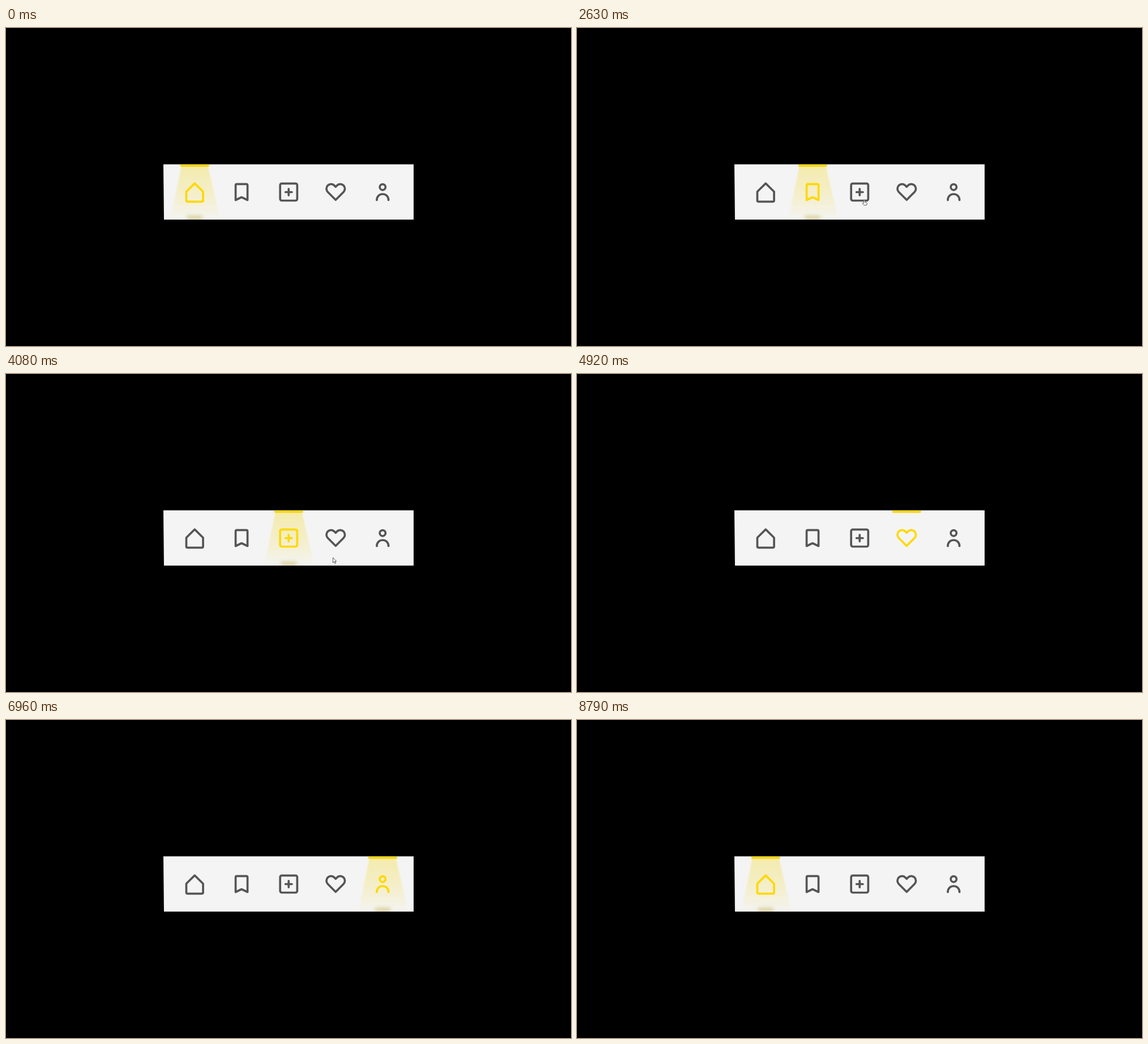
These frames come from a looping animation (998 by 561 pixels, 8.96 s). An HTML page:

```html
<!DOCTYPE html>
<html lang="en">
<head>
<meta charset="utf-8">
<title>Spotlight navigation</title>
<style>
  html, body { margin: 0; width: 100%; height: 100%; overflow: hidden; background: #000; }
  svg { display: block; width: 100%; height: 100%; }
  .icon { fill: none; stroke: #555; stroke-width: 3.7; stroke-linecap: round; stroke-linejoin: round; }
  .icon.active { stroke: #ffd900; }
  #cursor path { fill: #fff; stroke: #333; stroke-width: .8; stroke-linejoin: round; }
</style>
</head>
<body>
<svg viewBox="0 0 998 561">
  <defs>
    <path id="bar" d="M278 240.5H720V338H279Z"/>
    <clipPath id="panel"><use href="#bar"/></clipPath>
    <clipPath id="page"><rect x="278" y="240" width="442" height="102"/></clipPath>
    <linearGradient id="glow" x1="0" y1="0" x2="0" y2="1">
      <stop offset="0" stop-color="#f5d410" stop-opacity=".29"/>
      <stop offset=".5" stop-color="#f5d410" stop-opacity=".18"/>
      <stop offset="1" stop-color="#f5d410" stop-opacity=".01"/>
    </linearGradient>
    <filter id="soft" x="-20%" y="-20%" width="140%" height="140%"><feGaussianBlur stdDeviation=".8"/></filter>
    <filter id="blur" x="-60%" y="-200%" width="220%" height="500%"><feGaussianBlur stdDeviation="3"/></filter>
  </defs>

  <use href="#bar" fill="#f4f4f4"/>

  <path class="icon" d="M0-15.4L14.8-.8V14.8q0 2-2 2H-12.8q-2 0-2-2V-.8Z"/>
  <path class="icon" d="M-10.7 14V-12.2q0-2 2-2H8.3q2 0 2 2V14L-.2 9Z"/>
  <g class="icon"><rect x="-15.1" y="-15.2" width="30.2" height="30.2" rx="3"/><path d="M-5.6 0H5.6M0-5.6V5.6"/></g>
  <path class="icon" d="M0 13.8L-14-.3A8.1 8.1 0 0 1-2.3-11.6L0-9.3L2.3-11.6A8.1 8.1 0 0 1 14-.3Z"/>
  <g class="icon"><circle cy="-8.8" r="5.1"/><path d="M-10.3 14C-10.3 0 10.3 0 10.3 14"/></g>

  <g clip-path="url(#panel)">
    <g id="light">
      <g id="beam">
        <path d="M-23.5 244H23.5L45 338H-43Z" fill="url(#glow)" filter="url(#soft)"/>
        <rect x="-14" y="331" width="28" height="7" rx="3" fill="#b9a432" opacity=".42" filter="url(#blur)"/>
      </g>
      <rect x="-25.5" y="240.8" width="51" height="4.2" rx="2" fill="#ffd900"/>
    </g>
  </g>

  <g clip-path="url(#page)">
    <g id="cursor">
      <path id="arrow" d="M0 0V9L2.1 7.1L3.6 10.4L5 9.8L3.6 6.6H6.2Z"/>
      <path id="hand" d="M-1 6V1.2q1-1.5 2 0V4l3 .8q1.3.6 1 2.2l-.9 2.5H-.6L-3.4 6.5q.5-1.6 2.4-.2Z"/>
    </g>
  </g>
</svg>
<script>
  const LOOP = 8960;
  const MOVE = 400, FADE = 290, LAG = 30;
  const ENTER = 250, LEAVE = 300;
  const centerX = i => 333.3 + 83 * i;

  // The pointer enters at a point, rests beside its icon, clicks and drops out below.
  const visits = [
    { icon: 1, enter: 40, click: 1080, from: [453, 236], aim: -6 },
    { icon: 2, enter: 2380, click: 2790, from: [505, 338], aim: 8 },
    { icon: 3, enter: 4080, click: 4500, from: [577.5, 324], aim: 0 },
    { icon: 4, enter: 5580, click: 6210, from: [686, 320], aim: 8 },
    { icon: 0, enter: 7630, click: 8080, from: [346, 338], aim: 8 }
  ];

  const el = id => document.getElementById(id);
  const light = el('light'), beam = el('beam'), cursor = el('cursor');
  const arrow = el('arrow'), hand = el('hand');
  const icons = document.querySelectorAll('.icon');
  const mix = (a, b, k) => a + (b - a) * k;
  const place = (node, x, y) => node.setAttribute('transform', `translate(${x} ${y})`);
  const show = (node, on) => node.setAttribute('visibility', on ? 'visible' : 'hidden');

  // cubic-bezier(.25, .1, .25, 1)
  function ease(x) {
    if (x <= 0) return 0;
    if (x >= 1) return 1;
    const curve = (a, b, u) => 3 * a * u * (1 - u) ** 2 + 3 * b * u * u * (1 - u) + u ** 3;
    let lo = 0, hi = 1;
    for (let i = 0; i < 20; i++) {
      const mid = (lo + hi) / 2;
      if (curve(.25, .25, mid) < x) lo = mid; else hi = mid;
    }
    return curve(.1, 1, lo);
  }

  function drawLight(t) {
    const last = visits.findLast(v => t >= v.click);
    const active = last ? last.icon : 0;
    const previous = (active + 4) % 5;
    const age = last ? t - last.click - LAG : LOOP;
    const k = ease(age / MOVE);
    icons.forEach((icon, i) => icon.classList.toggle('active', i === active));
    place(light, mix(centerX(previous), centerX(active), k), 0);
    beam.setAttribute('opacity', age < MOVE ? 1 - k : ease((age - MOVE) / FADE));
  }

  function drawCursor(t) {
    const visit = visits.find(v => t >= v.enter && t < v.click + LEAVE);
    const resting = !!visit && t >= visit.enter + ENTER && t < visit.click;
    show(arrow, visit && !resting);
    show(hand, resting);
    if (!visit) return;
    const [x, y] = visit.from;
    const arrive = Math.min(1, (t - visit.enter) / ENTER);
    const leave = Math.max(0, (t - visit.click) / LEAVE) ** 2;
    place(cursor,
      mix(x, centerX(visit.icon) + visit.aim, arrive) + 24 * leave,
      mix(y, 303, arrive) + 40 * leave);
  }

  icons.forEach((icon, i) => place(icon, centerX(i), 289.5));

  const start = performance.now();
  function draw() {
    const t = (performance.now() - start) % LOOP;
    drawLight(t);
    drawCursor(t);
    requestAnimationFrame(draw);
  }
  draw();
</script>
</body>
</html>
```
